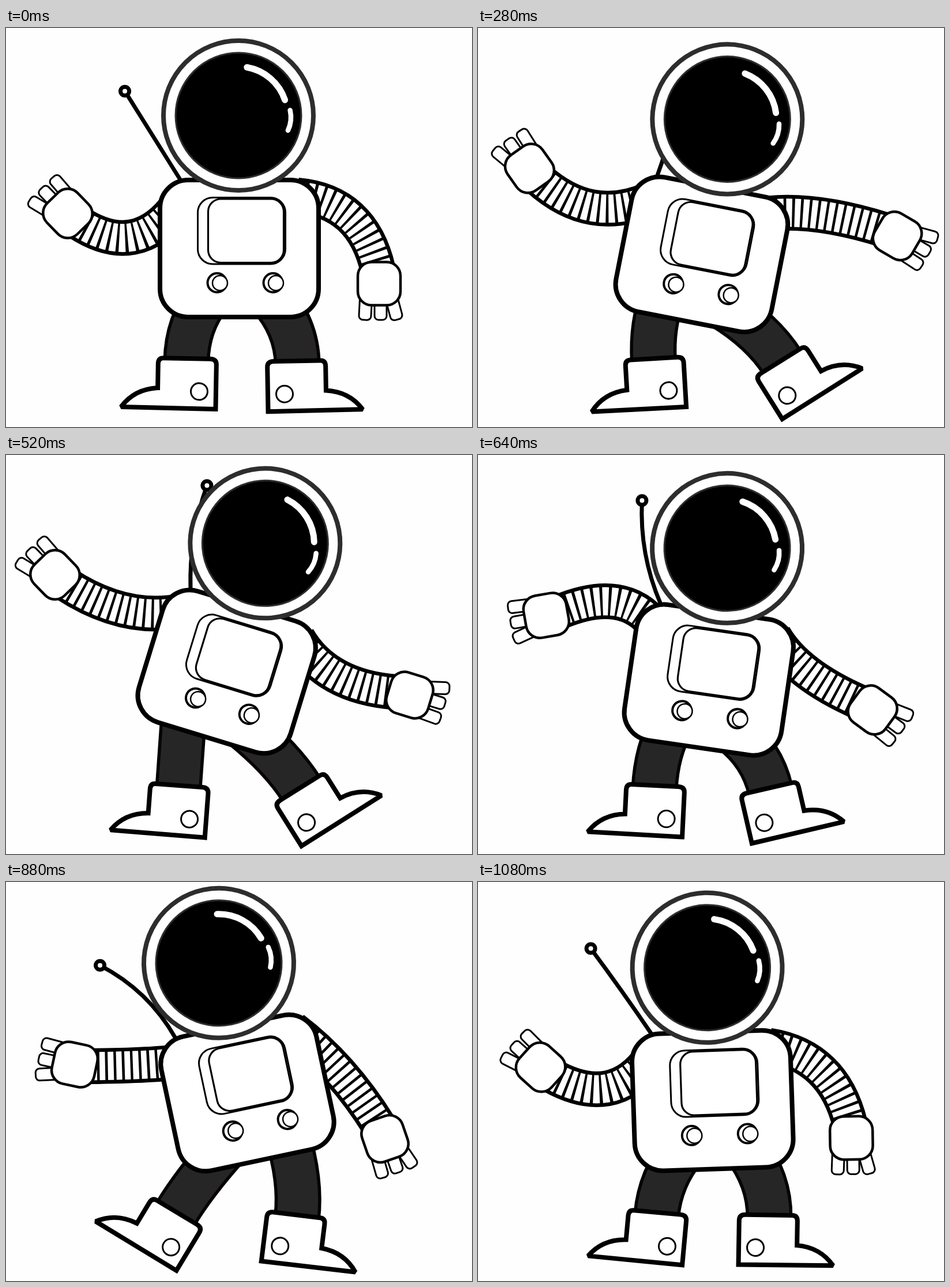
An HTML page with a canvas that plays this animation: 808x693 px, repeating every 1.12 s.

```html
<!DOCTYPE html>
<html lang="en">
<head>
<meta charset="utf-8">
<title>Dancing astronaut</title>
<style>
  html, body { margin: 0; width: 100%; height: 100%; overflow: hidden; background: #fefefe; }
  canvas { display: block; }
</style>
</head>
<body>
<canvas id="stage" width="808" height="693"></canvas>
<script>
const ctx = document.getElementById('stage').getContext('2d');
const LOOP = 1120, STEP = 40;
const INK = '#000', GREY = '#2d2d2d', CLOTH = '#262626', WHITE = '#fff';
const RAD = Math.PI / 180;

// Six key poses of the dance; everything else follows from these joints.
const TIMES = [0, 160, 360, 520, 720, 880];
const KEYS = {
  bodyX: [404.5, 398.5, 383.3, 382.7, 412.5, 418.5],
  bodyY: [383, 398, 388, 376.4, 398.3, 366.4],
  lean: [0, 4.7, 14.5, 17, 0, -12],
  swing: [-32, -9, 22, 9, -24, -46],
  curl: [0, 20, 0, -17, -22, 27],
  leftFoot: [1, -7, 0, 4.3, 2, 31],
  rightFoot: [-1, -15.5, -38, -32, -1, 7],
  rightFootX: [504, 515, 528, 509.5, 504, 504],
  leftHandX: [107, 102, 84, 85, 136, 119],
  leftHandY: [322, 289, 221, 208, 317, 317],
  leftHandTurn: [136, 146, 143, 136, 52, 102],
  rightHandX: [647, 700, 735, 700, 675, 657],
  rightHandY: [444, 389, 353, 417, 450, 446],
  rightHandTurn: [0, -25, -73, -73, -37, -19],
};

// Cyclic cubic easing through the keys, resting at each extreme.
function ease(keys, t) {
  const n = TIMES.length;
  const time = k => TIMES[(k + n) % n] + LOOP * Math.floor(k / n);
  const value = k => keys[(k + n) % n];
  const rate = k => (value(k + 1) - value(k)) / (time(k + 1) - time(k));
  const slope = k => {
    const a = rate(k - 1), b = rate(k);
    return a * b > 0 ? 2 * a * b / (a + b) : 0;
  };
  let i = n - 1;
  while (TIMES[i] > t) i--;
  const span = time(i + 1) - time(i);
  const u = (t - time(i)) / span, v = 1 - u;
  return value(i) * v * v * (1 + 2 * u) + value(i + 1) * u * u * (3 - 2 * u)
    + span * u * v * (slope(i) * v - slope(i + 1) * u);
}

// Local point of a placed part, in stage coordinates.
function toStage([x, y, angle], px, py) {
  const c = Math.cos(angle * RAD), s = Math.sin(angle * RAD);
  return [x + px * c - py * s, y + px * s + py * c];
}

function place([x, y, angle], draw, flip = 1) {
  ctx.save();
  ctx.translate(x, y);
  ctx.rotate(angle * RAD);
  ctx.scale(flip, 1);
  draw();
  ctx.restore();
}

function line(path, width, stroke = INK) {
  ctx.lineWidth = width;
  ctx.strokeStyle = stroke;
  ctx.stroke(path);
}

function paint(path, width, fill = WHITE, stroke = INK) {
  ctx.fillStyle = fill;
  ctx.fill(path);
  line(path, width, stroke);
}

function box(x, y, w, h, r) {
  const p = new Path2D();
  p.roundRect(x, y, w, h, r);
  return p;
}

function arc(x, y, r, from = 0, to = 360) {
  const p = new Path2D();
  p.arc(x, y, r, from * RAD, to * RAD);
  return p;
}

function bend(a, c, b) {
  const p = new Path2D();
  p.moveTo(...a);
  p.quadraticCurveTo(...c, ...b);
  return p;
}

const bootShape = new Path2D(
  'M51 87 L-113 86 C-100 68 -80 54 -50 52 L-50 10 Q-50 0 -41 0 L40 0 Q51 0 51 10 Z');

function drawLeg(torso, boot, side) {
  const hip = toStage(torso, 52 * side, 82);
  const leg = bend(toStage(boot, side, 5), toStage(boot, side, -60), hip);
  line(leg, 81, '#060203');
  line(leg, 70, CLOTH);
  place(boot, () => {
    ctx.miterLimit = 1.6;
    paint(bootShape, 8);
    paint(arc(22, 57, 14.5), 3);
  }, -side);
}

function drawHand() {
  for (const [x, tilt] of [[-24, 3], [2.5, 0], [27, -15]]) {
    place([x, 46, tilt], () => paint(box(-10.5, -24, 21, 41, 7), 3));
  }
  paint(box(-37, -37.5, 74, 75, 24), 4.5);
}

// The sleeve leaves the wrist at a fixed angle and bends towards the shoulder.
function drawArm(shoulder, hand) {
  const tube = bend(toStage(hand, -2, -24), toStage(hand, -29, -143), shoulder);
  line(tube, 62);
  line(tube, 49, WHITE);
  ctx.setLineDash([4.5, 10]);
  line(tube, 51);
  ctx.setLineDash([]);
  place(hand, drawHand);
}

function drawAntenna(torso, swing, curl) {
  const base = toStage(torso, -102, -119);
  const rod = [...base, swing];
  const ball = toStage(rod, 0, -182);
  line(bend(base, toStage(rod, curl, -91), ball), 7);
  paint(arc(...ball, 7.5), 7);
}

function drawBody() {
  paint(box(-137.5, -119, 275, 238, 49), 8);
  paint(box(-72, -88.5, 152, 115.5, 26), 3);
  paint(box(-54, -86, 131, 110.5, 22), 3.2);
  for (const x of [-33.5, 63.5]) {
    paint(arc(x - 5, 59.5, 16.5), 4);
    paint(arc(x, 60, 13), 2.5);
  }
}

function drawHead() {
  paint(arc(0, 0, 130), 8, WHITE, GREY);
  paint(arc(0, 0, 109), 3, INK, GREY);
  ctx.lineCap = 'round';
  line(arc(0, 0, 85, -80, -18.5), 11, WHITE);
  line(arc(37, 3, 54, -13, 25), 8.5, WHITE);
}

function render(t) {
  const p = {};
  for (const name in KEYS) p[name] = ease(KEYS[name], t);

  const torso = [p.bodyX, p.bodyY, p.lean];
  const stretch = 8 * Math.max(0, Math.sin(2 * Math.PI * t / LOOP));
  const leftFootX = 314 - (p.lean > 0 ? 0.8 : -1.45) * p.lean;

  ctx.fillStyle = '#fefefe';
  ctx.fillRect(0, 0, 808, 693);
  drawLeg(torso, [leftFootX, 574, p.leftFoot], -1);
  drawLeg(torso, [p.rightFootX, 578.3, p.rightFoot], 1);
  drawArm(toStage(torso, -105, -78), [p.leftHandX, p.leftHandY, p.leftHandTurn]);
  drawArm(toStage(torso, 100.5, -92), [p.rightHandX, p.rightHandY, p.rightHandTurn]);
  drawAntenna(torso, p.swing, p.curl);
  place(torso, drawBody);
  place([...toStage(torso, -1.5, -231 - stretch), p.lean], drawHead);
}

const start = performance.now();
function tick() {
  const t = Math.max(0, performance.now() - start) % LOOP;
  render(Math.floor(t / STEP) * STEP);
  requestAnimationFrame(tick);
}
tick();
</script>
</body>
</html>
```
